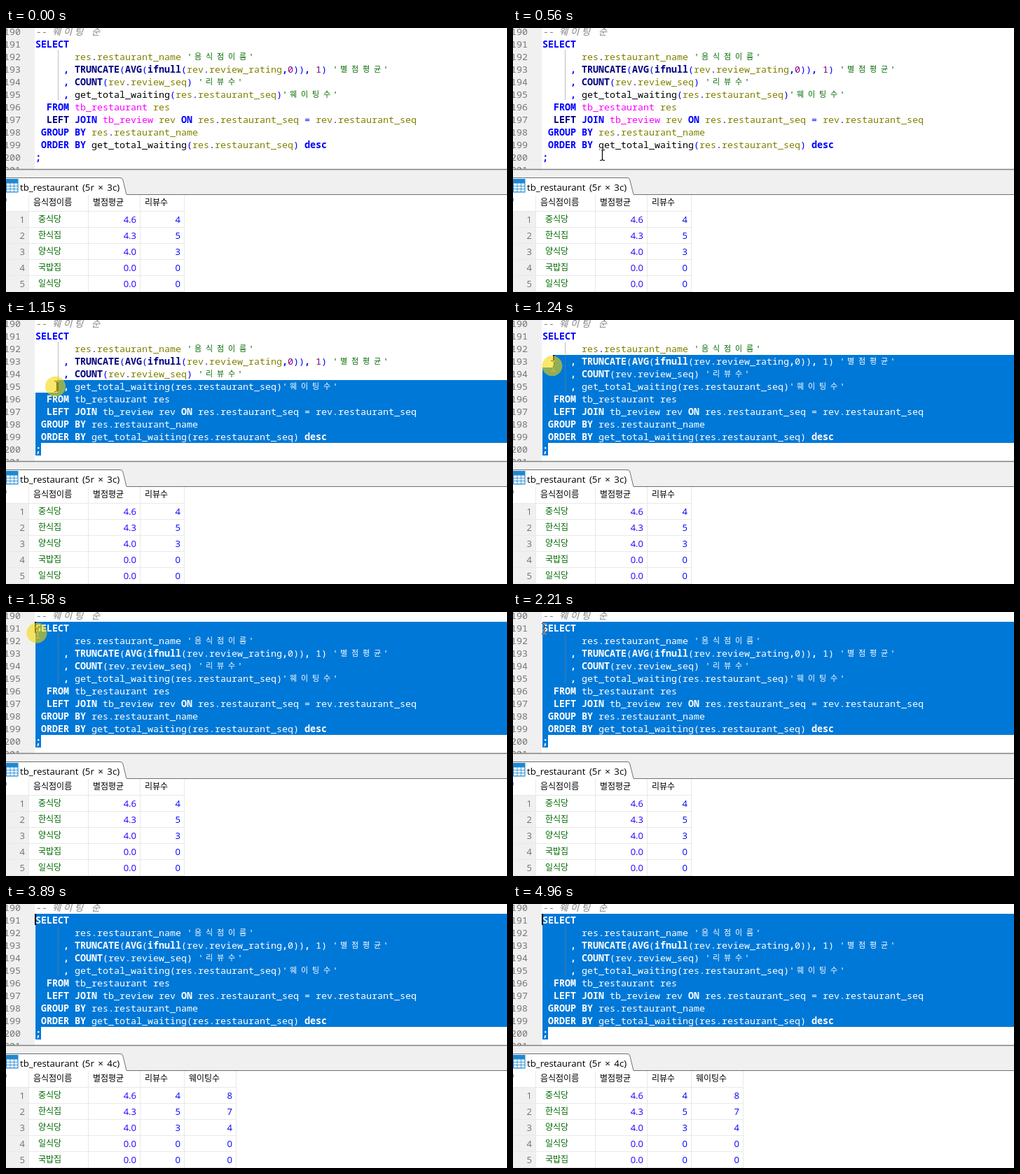
Recreate the animation shown at these times as an HTML page. Size 715 by 378 pixels, loop 5.5 s.

```html
<!DOCTYPE html>
<html lang="ko">
<head>
<meta charset="utf-8">
<title>Query editor</title>
<style>
html, body { margin: 0; width: 100%; height: 100%; overflow: hidden; background: #fff; }
svg { display: block; width: 715px; height: 378px; }
text { white-space: pre; }
.code { font: 13.333px "Noto Sans Mono", "Noto Sans CJK KR", monospace; }
.kw { fill: #00f; font-weight: 700; }
.fn { fill: #000080; font-weight: 700; }
.table { fill: #f0f; }
.name { fill: #808000; }
.plain { fill: #000; }
.str { fill: #006a00; }
.hangul { font-size: 11px; font-weight: 500; }
.num { fill: #800080; }
.sym { fill: #00f; }
.note { fill: #808080; font-style: italic; }
.white text { fill: #fff; }
.ui { font-family: "Open Sans", "Noto Sans CJK KR", sans-serif; font-size: 13px; }
.tab { font-size: 13.3px; word-spacing: 2px; }
.head { font-size: 12px; fill: #000; }
.cell { font-size: 12px; fill: #006a00; }
.row { fill: #707070; }
.real { fill: #2000ff; }
.int { fill: #00f; }
</style>
</head>
<body>
<svg id="stage" viewBox="0 0 715 378" xmlns="http://www.w3.org/2000/svg">
  <defs>
    <clipPath id="editor"><rect width="715" height="202"/></clipPath>
    <clipPath id="selected"><path id="clip"/></clipPath>
  </defs>
  <rect width="715" height="378" fill="#fff"/>
  <g clip-path="url(#editor)" class="code">
    <rect width="41" height="202" fill="#f0f0f0"/>
    <g id="numbers" fill="#777"></g>
    <g id="code"></g>
    <path id="selection" fill="#0078d7"/>
    <g clip-path="url(#selected)"><g id="inverse" class="white"></g></g>
    <path d="M74.5 32V104" stroke="#808080" stroke-dasharray="1 1"/>
    <rect id="caret" width="2" height="16"/>
  </g>
  <rect y="202" width="715" height="36" fill="#f0f0f0"/>
  <path d="M0 202.5H715" stroke="#808080" stroke-width="1.5"/>
  <path d="M0 214.5H163Q166 214.5 166.7 217L172 238V239H0Z" fill="#fff"/>
  <path d="M0 214.5H163Q166 214.5 166.7 217L172 238.5H715" fill="none" stroke="#707070"/>
  <rect y="216" width="17.5" height="19.5" fill="#1e88d0"/>
  <g id="icon" fill="#f4faff"></g>
  <rect y="244" width="1" height="4" fill="#4ba0e0"/>
  <rect y="262" width="32" height="116" fill="#f0f0f0"/>
  <g id="before" class="ui"></g>
  <g id="after" class="ui"></g>
  <path id="beam" d="M-3 -7.5H-1L.5 -6.5L2 -7.5H4M.5 -6.5V6.5M-3 7.5H-1L.5 6.5L2 7.5H4"
    fill="none" stroke="#fff" stroke-width="1.2" style="mix-blend-mode:difference"/>
  <path id="arrow" d="M.5 .5V16.5L4.2 13L6.6 18.5L9 17.5L6.6 12H11.7Z" fill="#fff" stroke="#000"/>
  <circle id="press" r="14.5" fill="#f5d800"/>
</svg>
<script>
const LOOP = 5500, LEFT = 42, TOP = 14, CHAR = 8, LINE = 18;
const $ = id => document.getElementById(id);

const sql = [
  "-- 웨이팅 순",
  "SELECT",
  "       res.restaurant_name '음식점이름'",
  "     , TRUNCATE(AVG(ifnull(rev.review_rating,0)), 1) '별점평균'",
  "     , COUNT(rev.review_seq) '리뷰수'",
  "     , get_total_waiting(res.restaurant_seq)'웨이팅수'",
  "  FROM tb_restaurant res",
  "  LEFT JOIN tb_review rev ON res.restaurant_seq = rev.restaurant_seq",
  " GROUP BY res.restaurant_name",
  " ORDER BY get_total_waiting(res.restaurant_seq) desc",
  ";"
];
const rules = [
  [/^--/, "note"],
  [/^'/, "str"],
  [/^[가-힣]/, "str hangul"],
  [/^\d/, "num"],
  [/^(SELECT|FROM|JOIN|ON|GROUP|ORDER|BY|desc|[,;])$/, "kw"],
  [/^(TRUNCATE|AVG|ifnull|COUNT|LEFT)$/, "fn"],
  [/^tb_/, "table"],
  [/^get_/, "plain"],
  [/^\w/, "name"],
  [/./, "sym"]
];

const cells = s => [...s].reduce((n, c) => n + (c > "\u1100" ? 2 : 1), 0);
const lineTop = i => TOP + (i - 1) * LINE;
const text = (x, y, s, cls, end) =>
  `<text x="${x}" y="${y}" class="${cls}"${end ? ' text-anchor="end"' : ""}>${s}</text>`;

// Every character sits on the column grid; Hangul takes two columns.
function codeLine(line, i) {
  return [...line.matchAll(/--.*|[가-힣]+|\w+|[^\s\w]/g)].map(m => {
    const token = m[0], start = cells(line.slice(0, m.index));
    const cls = rules.find(r => r[0].test(token))[1];
    const small = cls.includes("hangul");
    const xs = [...token].map((c, k) =>
      LEFT + CHAR * (start + cells(token.slice(0, k))) + (small ? 3 : 0));
    return text(xs.join(" "), lineTop(i) + (small ? 13 : 14), token, cls);
  }).join("");
}

function results(count, names, titles, values) {
  const edges = [32, 117, 191, 254, 328].slice(0, titles.length + 1);
  const right = edges[edges.length - 1];
  let out = text(20, 233, `tb_restaurant (5r × ${count}c)`, "tab");
  let grid = edges.map(x => `M${x + .5} 239V378`).join("");
  titles.forEach((s, k) => out += text(edges[k] + 7, 253.7, s, "head"));
  names.forEach((name, r) => {
    const y = 279 + r * 23;
    grid += `M0 ${y + 6.5}H${right}`;
    out += text(27, y, r + 1, "row", true) + text(46, y - .7, name, "cell");
    values[r].forEach((v, k) => out += text(edges[k + 2] - 5, y, v, k ? "int" : "real", true));
  });
  return `<path d="M0 262.5H${right}${grid}" stroke="#e9e9e9" fill="none"/>` + out;
}

function build() {
  $("code").innerHTML = $("inverse").innerHTML = sql.map(codeLine).join("");
  for (let i = 0; i < 12; i++)
    $("numbers").innerHTML += text(-3, lineTop(i) + 14, 190 + i, "");
  for (let i = 0; i < 9; i++)
    $("icon").innerHTML += `<rect x="${1 + i % 3 * 5.4}" y="${222.5 + (i / 3 | 0) * 4.2}" width="4.6" height="3.4"/>`;
  const titles = ["음식점이름", "별점평균", "리뷰수", "웨이팅수"];
  const scores = [["4.6", 4, 8], ["4.3", 5, 7], ["4.0", 3, 4], ["0.0", 0, 0], ["0.0", 0, 0]];
  $("before").innerHTML = results(3, ["중식당", "한식집", "양식당", "국밥집", "일식당"],
    titles.slice(0, 3), scores.map(s => s.slice(0, 2)));
  $("after").innerHTML = results(4, ["중식당", "한식집", "양식당", "일식당", "국밥집"], titles, scores);
}

// Pointer path: time, x, y
const path = [
  [130, 519, 329], [200, 455, 303], [340, 273, 232], [430, 160, 186], [490, 128, 171],
  [560, 127, 182], [940, 127, 182], [1030, 103, 147], [1130, 75, 102], [1240, 57, 66],
  [1350, 48, 45], [1480, 44, 33], [1550, 44, 33], [1580, 45, 30], [1690, 44, 24]
];

function pointer(t) {
  const i = path.findIndex(p => p[0] > t);
  if (i < 0) return path[path.length - 1].slice(1);
  if (i === 0) return path[0].slice(1);
  const [a, ax, ay] = path[i - 1], [b, bx, by] = path[i], k = (t - a) / (b - a);
  return [ax + (bx - ax) * k, ay + (by - ay) * k];
}

const show = (id, on) => $(id).setAttribute("display", on ? "inline" : "none");
const within = (t, a, b) => t >= a && t < b;

function draw(t) {
  const [x, y] = pointer(t);
  const overCode = y < 202;
  const visible = within(t, 130, 3300);
  show("beam", visible && overCode);
  show("arrow", visible && !overCode);
  for (const id of ["beam", "arrow"])
    $(id).setAttribute("transform", `translate(${Math.round(x)} ${Math.round(y)})`);

  const row = Math.max(1, Math.min(10, Math.floor((y - TOP) / LINE) + 1));
  const col = Math.max(0, Math.min(cells(sql[row]), Math.round((x - LEFT) / CHAR)));
  const headX = LEFT + col * CHAR, headY = lineTop(row), last = lineTop(10);
  let area = "";
  if (t >= 940 && row < 10)
    area = `M${headX} ${headY}H715V${last}H50V${last + LINE}H${LEFT}V${headY + LINE}H${headX}Z`;
  $("selection").setAttribute("d", area);
  $("clip").setAttribute("d", area);

  show("caret", within(t, 820, 2210) || within(t, 2720, 3270) || within(t, 3890, 4430) || t >= 4960);
  $("caret").setAttribute("x", headX - 1);
  $("caret").setAttribute("y", headY);

  const fade = t < 1890 ? 1 : t < 1920 ? .66 : .33;
  show("press", within(t, 820, 1950));
  $("press").setAttribute("cx", x - 1);
  $("press").setAttribute("cy", y);
  $("press").setAttribute("fill-opacity", .58 * fade);

  show("before", t < 3330);
  show("after", t >= 3330);
}

build();
const begin = performance.now();
function tick() {
  draw((performance.now() - begin) % LOOP);
  requestAnimationFrame(tick);
}
tick();
</script>
</body>
</html>
```
